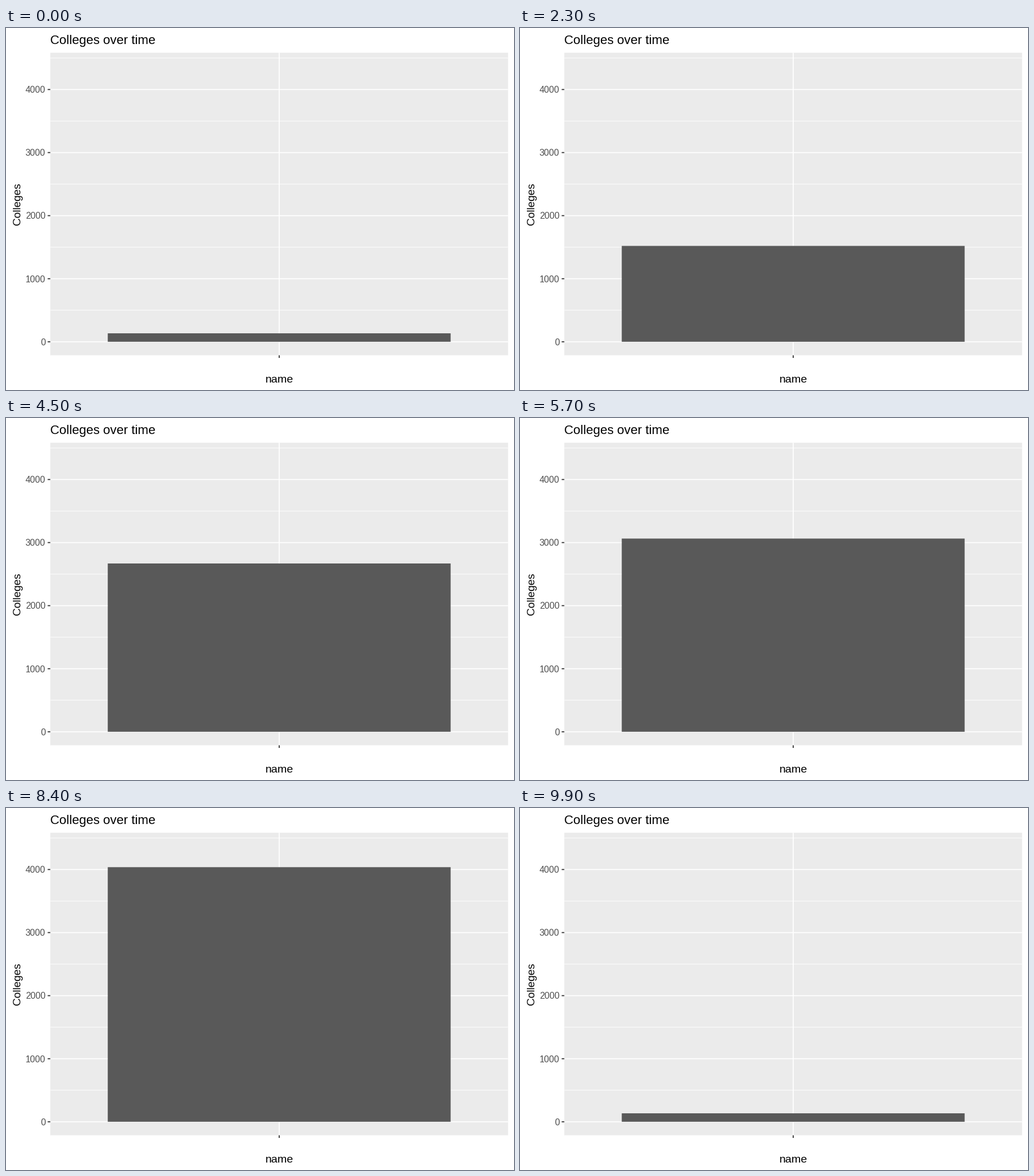
Write a matplotlib script that moves like this. It is 885 px wide and 632 px high and loops after 10 s.

```python
import matplotlib.pyplot as plt
import numpy as np
from matplotlib.animation import FuncAnimation
from matplotlib.patches import Rectangle

W, H, DPI = 885, 632, 100
FRAMES, INTERVAL = 100, 100
PT = 72 / DPI  # points per pixel

LEFT, RIGHT, TOP, BOTTOM = 77.2, 874.7, 43.2, 571.4
CENTER = (LEFT + RIGHT) / 2
ZERO, PER_COUNT = 547.8, 0.1101
TICK = 4.6
MAJOR, MINOR = 1.78, 0.9
BAR_WIDTH = 0.749 * (RIGHT - LEFT)

# College count at the turning points of its growth, then the drop back
GROWTH = {0: 134, 8: 766, 13: 1138, 23: 1520, 33: 2128, 38: 2203, 43: 2587,
          50: 2873, 62: 3200, 63: 3391, 75: 3810, 80: 4004, 83: 4008,
          95: 4358, 97: 3163, 99: 134}
# Frames that repeat the one before: every fifth at first, rarer later
RESTS = {*range(4, 50, 5), 51, 64, 66, 76, 96, 98}

plt.rcParams["font.family"] = "Liberation Sans"
fig = plt.figure(figsize=(W / DPI, H / DPI), dpi=DPI, facecolor="white")
ax = fig.add_axes([0, 0, 1, 1])
ax.set_xlim(0, W)
ax.set_ylim(H, 0)
ax.axis("off")


def box(x, y, w, h, color, z):
    patch = Rectangle((x, y), w, h, fc=color, lw=0, zorder=z, snap=False)
    return ax.add_patch(patch)


def line(xs, ys, color, width):
    ax.plot(xs, ys, color=color, lw=width * PT, zorder=2,
            solid_capstyle="butt", snap=False)


def label(x, y, text, px, color="black", **kw):
    ax.text(x, y, text, fontsize=px * PT, color=color, va="baseline", **kw)


def count_y(count):
    return ZERO - count * PER_COUNT


def count_at(frame):
    shown = frame - (frame in RESTS)
    return np.interp(shown, list(GROWTH), list(GROWTH.values()))


box(LEFT, TOP, RIGHT - LEFT, BOTTOM - TOP, "#EBEBEB", 1)

for count in range(0, 5000, 500):
    y = count_y(count)
    major = count % 1000 == 0
    line([LEFT, RIGHT], [y, y], "white", MAJOR if major else MINOR)
    if major:
        line([LEFT - TICK, LEFT], [y, y], "#333333", MAJOR)
        label(68.8, y + 5.9, str(count), 15.6, "#4D4D4D", ha="right")
line([CENTER, CENTER], [TOP, BOTTOM], "white", MAJOR)
line([CENTER, CENTER], [BOTTOM, BOTTOM + TICK], "#333333", MAJOR)

label(77, 28.4, "Colleges over time", 22.2)
label(CENTER, 618.6, "name", 19.5, ha="center")
label(24.8, 306.8, "Colleges", 19.2, ha="center",
      rotation=90, rotation_mode="anchor")

bar = box(CENTER - BAR_WIDTH / 2, ZERO, BAR_WIDTH, 0, "#595959", 3)


def update(frame):
    top = count_y(count_at(frame))
    bar.set_y(top)
    bar.set_height(ZERO - top)
    return [bar]


anim = FuncAnimation(fig, update, frames=FRAMES, interval=INTERVAL,
                     init_func=lambda: update(0), repeat=True, repeat_delay=0)
plt.show()
```
